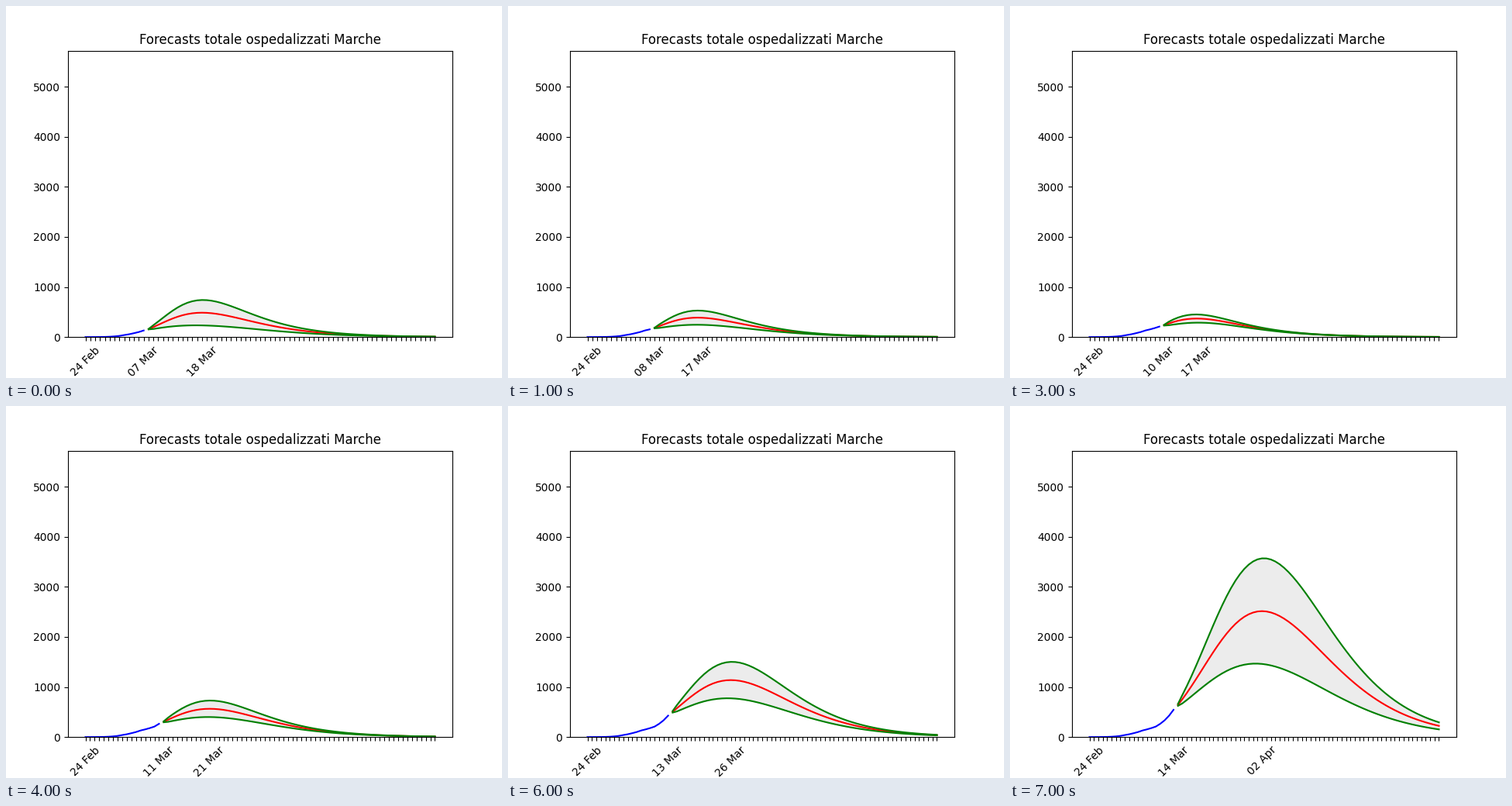
Write a matplotlib script that moves like this. It is 640 by 480 pixels and loops after 8000 ms.

```python
import numpy as np
import matplotlib.pyplot as plt
from matplotlib.animation import FuncAnimation

plt.rcParams["font.family"] = "DejaVu Sans"

FIRST_TODAY = 12
HORIZON = 60
Y_TOP = 5720
DECAY = 0.106      # daily decline far beyond the peak
MOMENTUM = 1.05    # share of the recent daily rise carried into the forecast

# Days from the start of each forecast to its peak, and the peak itself
WAITS = [11, 9, 9, 7, 10, 10, 13, 19]
PEAKS = [487, 388, 400, 370, 565, 692, 1138, 2515]
RUNS = len(PEAKS)


def cases(day):
    """Hospital patients: exponential growth between a few key days."""
    key_days = [0, 3, 6, 8, 10, 12, 15, 17, 19]
    counts = [0.3, 2, 14, 41, 78, 132, 210, 336, 545]
    return np.exp(np.interp(day, key_days, np.log(counts)))


def date_label(day):
    for month, offset, length in (("Feb", 24, 29), ("Mar", -5, 31), ("Apr", -36, 30)):
        if day + offset <= length:
            return f"{day + offset:02d} {month}"


def epidemic(steps, wait, first, peak):
    """Skewed bell that starts at first and tops out after wait days."""
    x = np.linspace(0.01, 4, 2000)
    climb = (np.exp(x) - 1 - x) / x
    k = np.interp(np.log(peak / first) / (DECAY * wait), climb, x) / wait
    z = k * (steps - wait)
    return peak * np.exp(-DECAY / k * (np.exp(-z) + z - 1))


def relative_band(steps, wait, growth, run):
    """Uncertainty opens quickly, then closes; more data make it narrower."""
    gain = growth * (0.44 - 0.147 * (run / (RUNS - 1)) ** 4)
    u = steps / (1.6 * wait - 5)
    return 0.03 + gain * (u * np.exp(1 - u)) ** 0.7


fig, ax = plt.subplots(figsize=(6.4, 4.8), dpi=100)


def draw(run):
    today = FIRST_TODAY + run
    wait, peak = WAITS[run], PEAKS[run]
    first = cases(today) + MOMENTUM * (cases(today) - cases(today - 3)) / 3
    steps = np.arange(HORIZON)
    past, days = np.arange(today + 1), today + 1 + steps
    mid = epidemic(steps, wait, first, peak)
    half = mid * relative_band(steps, wait, np.log(peak / first), run)

    ax.clear()
    ax.plot(past, cases(past), color="b")
    ax.plot(days, mid, color="r")
    for edge in (mid + half, mid - half):
        ax.plot(days, edge, color="g")
    ax.fill_between(days, mid - half, mid + half, color="gray", alpha=0.15)

    end = days[-1]
    labels = [""] * (end + 1)
    labels[0] = date_label(0)
    labels[today] = date_label(today)
    labels[days[wait]] = date_label(today + wait)
    ax.set_xticks(range(end + 1), labels, rotation=45)
    ax.set_xlim(-0.05 * end, 1.05 * end)
    ax.set_ylim(0, Y_TOP)
    ax.set_title("Forecasts totale ospedalizzati Marche")
    return []


anim = FuncAnimation(fig, draw, frames=RUNS, interval=1000,
                     init_func=lambda: [], repeat=True)
plt.show()
```
